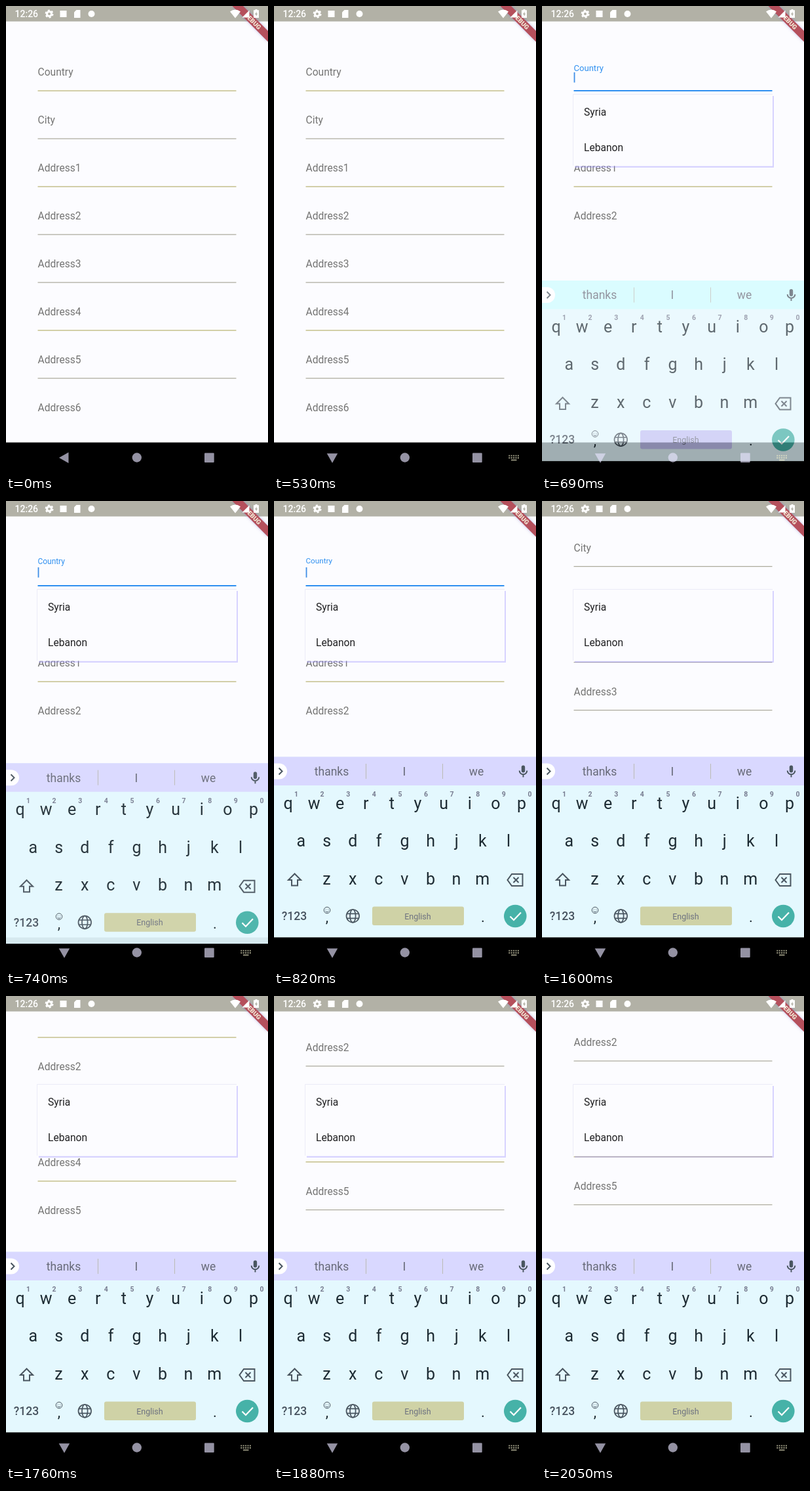
An HTML page for the animation above (3.03 s loop, 400x711 px).

```html
<!DOCTYPE html>
<html lang="en">
<head>
<meta charset="utf-8">
<title>Form with suggestions</title>
<style>
html, body { margin: 0; width: 100%; height: 100%; overflow: hidden; background: #fcfcff; }
svg { display: block; width: 100vw; height: 100vh; }
text { font-family: Roboto, sans-serif; white-space: pre; }
.mid { text-anchor: middle; }
.line { fill: none; stroke: #4a5660; stroke-width: 2; }
</style>
</head>
<body>
<svg viewBox="0 0 400 711" xmlns="http://www.w3.org/2000/svg">
  <defs>
    <clipPath id="view"><rect id="viewBox" x="0" y="48" width="400" height="570"/></clipPath>
    <filter id="soft" x="-20%" y="-20%" width="140%" height="140%"><feGaussianBlur stdDeviation="2"/></filter>
  </defs>
  <rect width="400" height="711" fill="#fcfcff"/>

  <g clip-path="url(#view)"><g id="list"></g></g>

  <g id="menu">
    <path d="M352 137H354V246H50V243.500H352Z" fill="#8f84ff" fill-opacity=".34"/>
    <rect x="48" y="134" width="304" height="109.500" fill="#fcfcff"/>
    <path d="M47.500 243V134.500H352" fill="none" stroke="#ebebf7"/>
    <g font-size="15.6" fill="#202022">
      <text x="64" y="166.500">Syria</text>
      <text x="64" y="221">Lebanon</text>
    </g>
  </g>

  <rect y="664.500" width="400" height="47" fill="#000"/>

  <g id="keyboard">
    <rect y="389.500" width="400" height="275" fill="#e4f8fe"/>
    <rect id="bar" y="389.500" width="400" height="43.500" fill="#d9d8ff"/>
    <rect y="664.500" width="400" height="120" fill="#000"/>
    <path d="M0 399.500H8a12 12 0 0 1 0 24H0Z" fill="#fff"/>
    <path class="line" d="M7.500 406.500l5 5-5 5"/>
    <path d="M140.500 400v23M257.500 400v23" stroke="#bbbbb4"/>
    <g class="mid" font-size="17.5" fill="#676a78">
      <text x="88" y="418">thanks</text>
      <text x="199" y="418">I</text>
      <text x="309" y="418">we</text>
    </g>
    <rect x="377.800" y="402.500" width="5.400" height="11" rx="2.700" fill="#4a5660"/>
    <path class="line" stroke-width="1.6" d="M374.700 410.500a5.800 5.800 0 0 0 11.600 0M380.500 416.500v4"/>
    <g id="keys" class="mid"></g>
    <path class="line" d="M31.500 567.500L22 577H27V585.500H36V577H41Z"/>
    <path class="line" d="M363 568H379.500V586H363L356.500 577ZM365.500 573l8 8M373.500 573l-8 8"/>
    <text class="mid" x="31" y="638" font-size="17.5" font-weight="500" fill="#46525e">?123</text>
    <g fill="none" stroke="#4a5660">
      <circle cx="81" cy="623" r="4.800"/>
      <path d="M78.500 624.500q2.500 3 5 0M79.200 621.500v1M82.800 621.500v1"/>
      <g stroke-width="1.700">
        <circle cx="120.300" cy="631.800" r="9.800"/>
        <ellipse cx="120.300" cy="631.800" rx="4.300" ry="9.800"/>
        <path d="M111.500 628.300h17.600M111.500 635.300h17.600"/>
      </g>
    </g>
    <text class="mid" x="81" y="641" font-size="22" fill="#1d2b33">,</text>
    <text class="mid" x="319" y="641" font-size="22" fill="#1d2b33">.</text>
    <rect id="space" x="150" y="617.500" width="140" height="28.500" rx="3" fill="#cfd2a6"/>
    <text class="mid" x="219.500" y="636.500" font-size="12.5" fill="#6c7180">English</text>
    <circle cx="368.300" cy="632" r="17.300" fill="#46b2a8"/>
    <path d="M360.500 632.500l5.500 5.500 11-11.500" fill="none" stroke="#fff" stroke-width="2.200"/>
  </g>

  <g fill="#e8e4ff" fill-opacity=".64">
    <path id="back" d="M81 687.800L95.500 679.500V696Z"/>
    <circle cx="199.800" cy="687.500" r="7.200"/>
    <rect x="303" y="680.500" width="14.700" height="14.500" rx="1"/>
    <g id="imeIcon" fill="#f2f0cc"></g>
  </g>

  <rect width="400" height="23.500" fill="#b2b1a6"/>
  <path d="M345.500 0H362L400 38V54.500Z" fill="#7a70c8" fill-opacity=".5" filter="url(#soft)"/>
  <path d="M345.500 0H362L400 38V54.500Z" fill="#b5505c"/>
  <text class="mid" transform="translate(377 23) rotate(45)" y="3.500" font-size="9.7" font-weight="900" fill="#f3ecd8">DEBUG</text>

  <g fill="#fff">
    <text x="13.500" y="17" font-size="14" font-weight="500">12:26</text>
    <circle cx="66" cy="12" r="3.500" fill="none" stroke="#fff" stroke-width="3"/>
    <circle cx="66" cy="12" r="5.500" fill="none" stroke="#fff" stroke-width="2" stroke-dasharray="3 2.760"/>
    <rect x="82.500" y="7" width="10" height="10"/>
    <path d="M107.500 6H113.500V18H104V9.500Z"/>
    <circle cx="130.500" cy="12" r="5"/>
    <path d="M350 18.500L342 8.500Q350 2.500 358 8.500Z"/>
    <path d="M360.500 17.500L371.500 6.500V17.500Z"/>
    <path fill-rule="evenodd" d="M380.500 5h3v1.300h2.500V18h-8V6.300h2.500ZM382.600 8.500l-2.600 4.500h1.700v3l2.500-4.500h-1.600Z"/>
  </g>
</svg>
<script>
const LOOP = 3030;
const STEPS = [0, 160, 200, 240, 530, 570, 630, 690, 740, 780, 820, 1430,
  1520, 1560, 1600, 1640, 1680, 1720, 1760, 1800, 1840, 1890, 1930, 1970, 2010, 2050];
const PITCH = 72.95, PEAK = 253, REST = 249;
const BLUE = '#2f90f0', GREY = '#757574';

const $ = id => document.getElementById(id);
const span = (t, a, b) => Math.min(1, Math.max(0, (t - a) / (b - a)));
const smooth = u => u * u * (3 - 2 * u);
const easeOut = (u, k) => 1 - (1 - u) ** k;

function add(parent, tag, attrs, label) {
  const el = document.createElementNS('http://www.w3.org/2000/svg', tag);
  for (const k in attrs) el.setAttribute(k, attrs[k]);
  if (label) el.textContent = label;
  parent.appendChild(el);
  return el;
}

function set(id, attrs) {
  for (const k in attrs) $(id).setAttribute(k, attrs[k]);
}

// Form fields
const names = ['Country', 'City'];
for (let i = 1; i <= 6; i++) names.push('Address' + i);
names.forEach((name, i) => {
  const y = i * PITCH;
  add($('list'), 'text', {
    id: 'label' + i, transform: `translate(48.5 ${106.3 + y})`, 'font-size': 15.6, fill: GREY
  }, name);
  add($('list'), 'rect', {
    id: 'rule' + i, x: 48.5, y: 128.5 + y, width: 303, height: 1.2,
    fill: [0, 2, 5].includes(i) ? '#b8b270' : '#aaa89a'
  });
});
add($('list'), 'rect', { id: 'caret', x: 48.6, y: 101, width: 1.8, height: 15.5, fill: '#3f8fe6' });

// Letter keys
[['qwertyuiop', 21.5, 468.7], ['asdfghjkl', 41.2, 526], ['zxcvbnm', 80.5, 583.5]].forEach(([row, x0, y], r) => {
  [...row].forEach((key, i) => {
    const x = x0 + i * 39.6;
    add($('keys'), 'text', { x, y, 'font-size': 25, fill: '#1d2b33' }, key);
    if (r === 0) {
      add($('keys'), 'text', {
        x: x + 12.5, y: 450, 'font-size': 10.5, 'font-weight': 700, fill: '#777c90'
      }, String((i + 1) % 10));
    }
  });
});

// Keyboard switcher in the navigation bar
for (let i = 0; i < 10; i++) {
  add($('imeIcon'), 'rect', { x: 358.3 + (i % 5) * 3.4, y: i < 5 ? 683.7 : 687, width: 2, height: 2 });
}
add($('imeIcon'), 'rect', { x: 362, y: 690.4, width: 8.5, height: 1.8 });

function draw(t) {
  const turn = span(t, 120, 240);
  set('back', { transform: `rotate(${-90 * turn} 89 687.8)` });
  set('imeIcon', { opacity: turn });

  const focused = t >= 570;
  const opened = t >= 630;
  const lift = smooth(span(t, 570, 770));
  set('label0', {
    transform: `translate(48.5 ${106.3 - 11.3 * lift}) scale(${1 - 0.25 * lift})`,
    fill: lift > 0 ? BLUE : GREY
  });
  set('rule0', { height: focused ? 2 : 1.2, y: focused ? 128 : 128.5, fill: focused ? BLUE : '#b8b270' });
  set('caret', { opacity: focused && t < 1430 ? 1 : 0 });
  set('viewBox', { height: opened ? 294 : 570 });
  set('menu', { opacity: opened ? 1 : 0 });

  const slide = span(t, 630, 810);
  set('keyboard', {
    transform: `translate(0 ${64 * (1 - easeOut(slide, 2))})`,
    opacity: easeOut(slide, 3)
  });
  const early = t < 740;
  set('bar', { fill: early ? '#cdfcff' : '#d9d8ff' });
  set('space', { fill: early ? '#c4c4f4' : '#cfd2a6' });

  const drag = PEAK * easeOut(span(t, 1500, 1930), 1.96);
  const settle = (PEAK - REST) * span(t, 1930, 2050);
  set('list', { transform: `translate(0 ${settle - drag})` });
}

function tick() {
  const now = performance.now() % LOOP;
  draw(STEPS.filter(s => s <= now).pop());
  requestAnimationFrame(tick);
}
tick();
</script>
</body>
</html>
```
